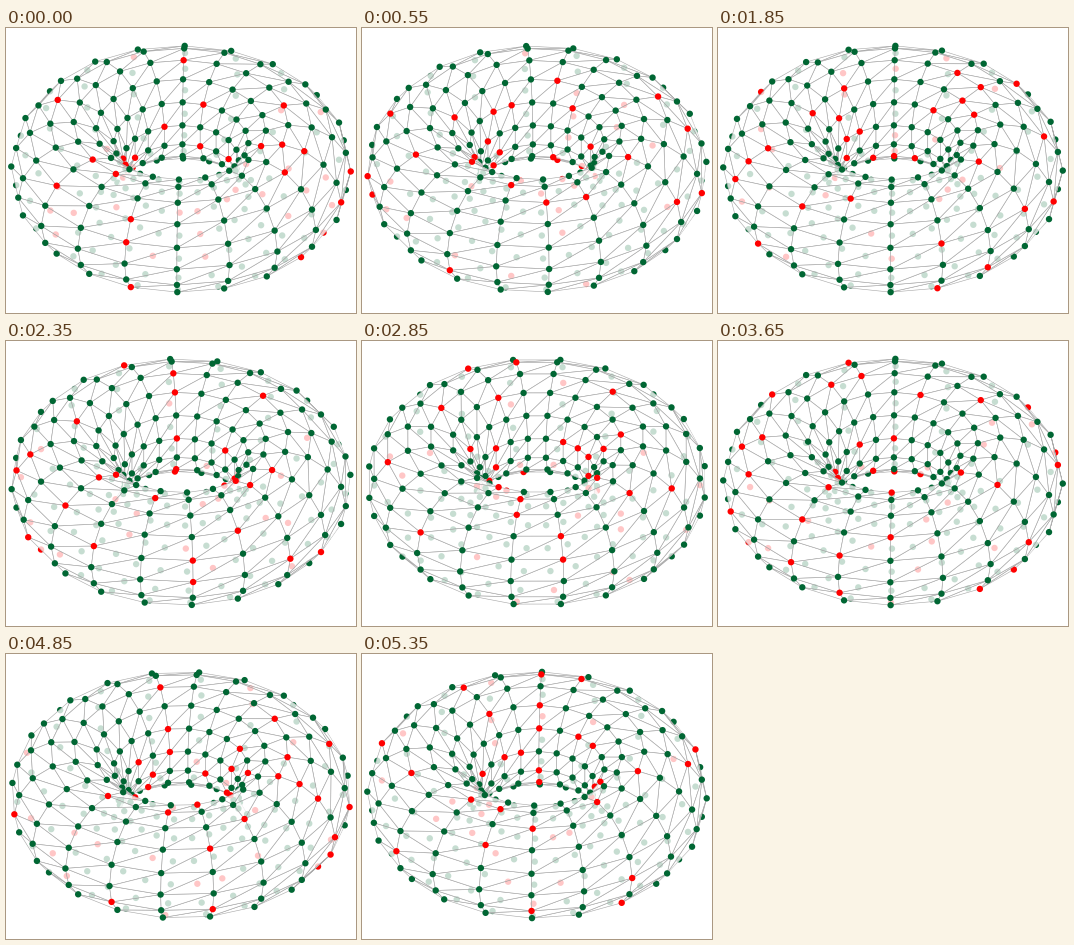
Recreate the animation shown at these times as a matplotlib script. Size 350 by 285 pixels, loop 5.4 s.

```python
import numpy as np
import matplotlib.pyplot as plt
from matplotlib.animation import FuncAnimation
from matplotlib.collections import PolyCollection

W, H, DPI = 350, 285, 100
FRAMES, INTERVAL = 108, 50
COLS, ROWS = 20, 15
MINOR = 56.6
MAJOR = 2 * MINOR
TILT = np.radians(36.2)
CX, CY = 175.0, 141.0
START, STEP = -1.4, 0.5        # degrees, degrees per frame
DOT_RADIUS = 3.2
RED_COUNT = 50

RED = (1, 0, 0, 1)
GREEN = (0, 0.4, 0.2, 1)
FACE = (1, 1, 1, 0.78)
EDGE = (0.66, 0.66, 0.66, 1)
CLEAR = (0, 0, 0, 0)


def build_triangles():
    j, i = np.meshgrid(np.arange(COLS), np.arange(ROWS), indexing="ij")
    j, i = j.ravel(), i.ravel()
    j2, i2 = (j + 1) % COLS, (i + 1) % ROWS
    a, b = j * ROWS + i, j2 * ROWS + i
    c, d = j2 * ROWS + i2, j * ROWS + i2
    return np.concatenate([np.stack([a, b, c], 1), np.stack([a, c, d], 1)])


TRIS = build_triangles()
N_TRIS, N_DOTS = len(TRIS), COLS * ROWS
turn = np.linspace(0, 2 * np.pi, 20, endpoint=False)
CIRCLE = DOT_RADIUS * np.stack([np.cos(turn), np.sin(turn)], 1)


def project(spin):
    """Screen positions and depth (towards the viewer) of all vertices."""
    theta = spin + 2 * np.pi * np.arange(COLS)[:, None] / COLS
    phi = 2 * np.pi * np.arange(ROWS)[None, :] / ROWS
    ring = MAJOR + MINOR * np.cos(phi)
    x, front = ring * np.sin(theta), ring * np.cos(theta)
    z = MINOR * np.sin(phi) + 0 * theta
    up = z * np.cos(TILT) - front * np.sin(TILT)
    depth = z * np.sin(TILT) + front * np.cos(TILT)
    pts = np.stack([CX + x, CY - up], -1).reshape(-1, 2)
    return pts, depth.ravel()


def faces_viewer(corners):
    u, v = corners[:, 1] - corners[:, 0], corners[:, 2] - corners[:, 0]
    return u[:, 0] * v[:, 1] - u[:, 1] * v[:, 0] < 0


fig = plt.figure(figsize=(W / DPI, H / DPI), dpi=DPI, facecolor="white")
ax = fig.add_axes([0, 0, 1, 1])
ax.set_xlim(0, W)
ax.set_ylim(H, 0)
ax.axis("off")
mesh = PolyCollection([], closed=True)
ax.add_collection(mesh, autolim=False)

widths = np.array([0.42] * N_TRIS + [0.0] * N_DOTS)


def draw(n):
    pts, depth = project(np.radians(START + STEP * n))
    corners = pts[TRIS]
    tri_depth = depth[TRIS].mean(axis=1)

    # a dot lies just above the nearest triangle that touches it
    dot_depth = np.full(N_DOTS, -np.inf)
    np.maximum.at(dot_depth, TRIS.ravel(), np.repeat(tri_depth, 3))
    order = np.argsort(np.concatenate([tri_depth, dot_depth + 0.01]))

    fills = np.array([FACE] * N_TRIS + [GREEN] * N_DOTS, dtype=float)
    rng = np.random.default_rng(700 + n)
    fills[N_TRIS + rng.choice(N_DOTS, RED_COUNT, replace=False)] = RED

    edges = np.array([CLEAR] * (N_TRIS + N_DOTS), dtype=float)
    edges[:N_TRIS][faces_viewer(corners)] = EDGE

    shapes = list(corners) + list(pts[:, None, :] + CIRCLE)
    mesh.set_verts([shapes[s] for s in order])
    mesh.set_facecolor(fills[order])
    mesh.set_edgecolor(edges[order])
    mesh.set_linewidth(widths[order])
    return (mesh,)


anim = FuncAnimation(fig, draw, frames=FRAMES, init_func=lambda: draw(0),
                     interval=INTERVAL, repeat=True, repeat_delay=0, blit=False)
plt.show()
```
